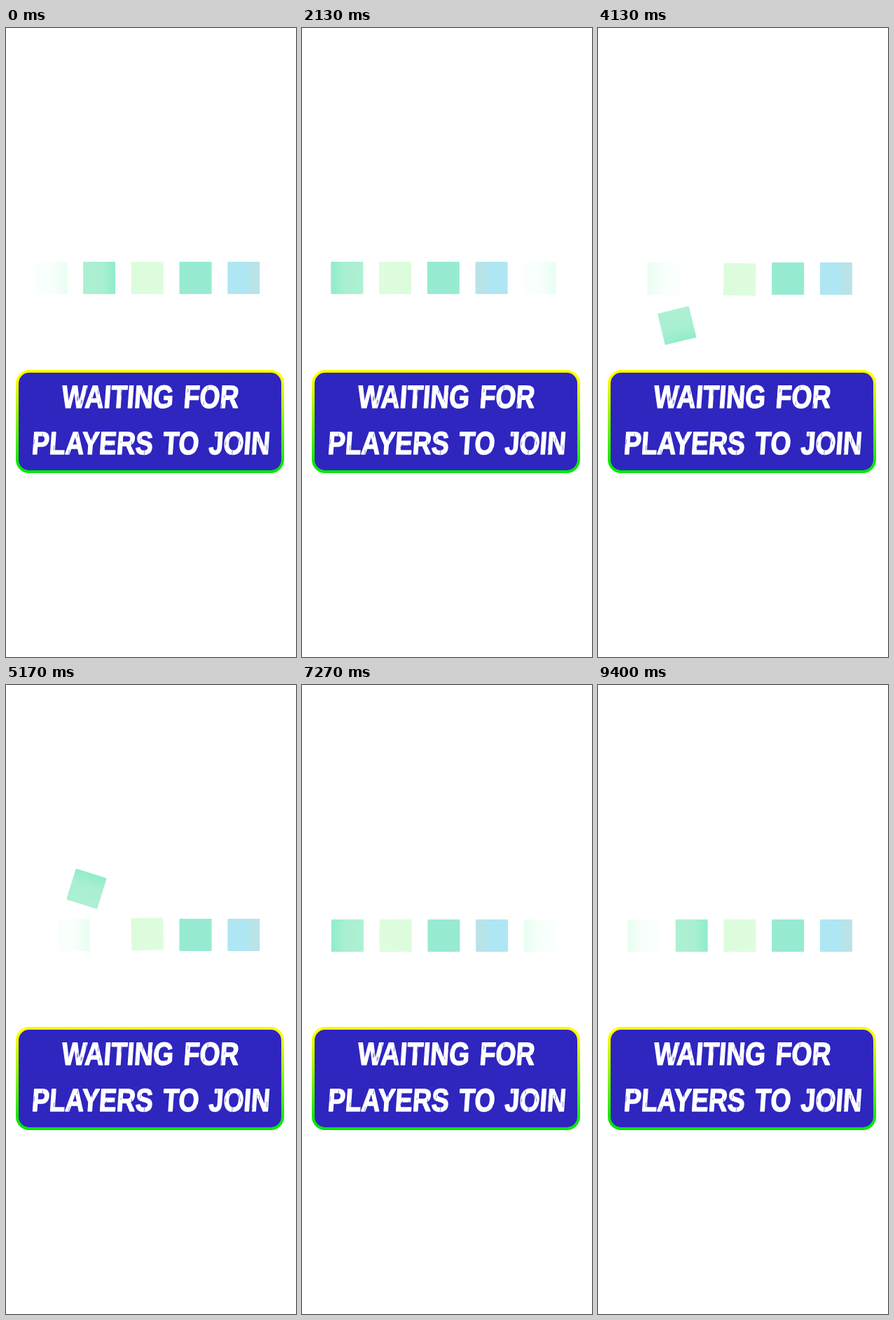
These frames come from a looping animation (414x896 px, 9430 ms). An HTML page:

```html
<!DOCTYPE html>
<html lang="en">
<head>
<meta charset="utf-8">
<title>Waiting for players to join</title>
<style>
  html, body { margin: 0; width: 100%; height: 100%; overflow: hidden; background: #fff; }
  svg { display: block; width: 414px; height: 896px; }
  .label {
    font: bold 45.5px "Liberation Sans", Arial, sans-serif;
    word-spacing: 5px;
    text-anchor: middle;
    fill: #fff;
    stroke: #fff;
    stroke-width: 1.6;
    stroke-linejoin: round;
  }
</style>
</head>
<body>
<svg viewBox="0 0 414 896">
  <defs>
    <linearGradient id="rim" x2="0" y2="1">
      <stop stop-color="#ff0"/>
      <stop offset=".08" stop-color="#fbff00"/>
      <stop offset=".92" stop-color="#0be800"/>
      <stop offset="1" stop-color="#00e60c"/>
    </linearGradient>
    <linearGradient id="pale">
      <stop stop-color="#fafffd"/>
      <stop offset=".5" stop-color="#f8fffb"/>
      <stop offset="1" stop-color="#e8fef0"/>
    </linearGradient>
    <linearGradient id="mint">
      <stop stop-color="#aef0d4"/>
      <stop offset=".6" stop-color="#a9efd1"/>
      <stop offset="1" stop-color="#8fedca"/>
    </linearGradient>
    <linearGradient id="lime">
      <stop stop-color="#dcfcdc"/>
      <stop offset="1" stop-color="#dffcdf"/>
    </linearGradient>
    <linearGradient id="sky">
      <stop stop-color="#aee7f3"/>
      <stop offset=".62" stop-color="#aee6f2"/>
      <stop offset=".72" stop-color="#b8e3e8"/>
      <stop offset="1" stop-color="#bbe3e6"/>
    </linearGradient>
  </defs>
  <g id="tiles"></g>
  <rect x="16" y="489" width="379" height="143" rx="17" fill="#2e26bf" stroke="url(#rim)" stroke-width="4"/>
  <text class="label" transform="translate(205 541.3) skewX(-4) scale(.82 1)">WAITING FOR</text>
  <text class="label" transform="translate(206 607.3) skewX(-4) scale(.82 1)">PLAYERS TO JOIN</text>
  <path id="wear" fill="none" stroke="#2e26bf" stroke-width=".8" opacity=".7"/>
</svg>
<script>
  const LOOP = 9430, CYCLE = 4740, DOWN_AT = 2530, DOWN_BASE = 2541;
  const SIZE = 46, PITCH = 68.75, HOP = 68.75;
  const MIDS = [471, 816, 1150, 1560];   // middle of each hop, in ms
  const RISE = 450, SETTLE = 560;        // hop time before and after its middle
  const SLIDE_AT = -28, SLIDE = 2045;

  const tiles = document.getElementById('tiles');

  function tile(fill) {
    const r = document.createElementNS('http://www.w3.org/2000/svg', 'rect');
    const set = { x: -SIZE / 2, y: -SIZE / 2, width: SIZE, height: SIZE, rx: 1, fill };
    for (const k in set) r.setAttribute(k, set[k]);
    return tiles.appendChild(r);
  }

  const slider = tile('url(#pale)');
  const hoppers = ['url(#mint)', 'url(#lime)', '#96ebd2', 'url(#sky)'].map(tile);

  const clamp = v => Math.min(1, Math.max(0, v));
  const sine = u => (1 - Math.cos(Math.PI * u)) / 2;
  const cubic = u => u < .5 ? 4 * u ** 3 : 1 - 4 * (1 - u) ** 3;

  // share of the half turn made, ms from the middle of the hop
  const turn = ms => ms < 0
    ? .5 * clamp(1 + ms / RISE) ** 2.3
    : 1 - .5 * clamp(1 - ms / SETTLE) ** 3;

  function place(el, x, y, angle) {
    el.setAttribute('transform', `translate(${x.toFixed(2)} ${y.toFixed(2)}) rotate(${angle.toFixed(2)})`);
  }

  function draw(time) {
    const c = time >= CYCLE + SLIDE_AT ? time - CYCLE : time;
    const down = c >= DOWN_AT;
    const ms = down ? c - DOWN_BASE : c;
    const x0 = down ? 64.9 : 64.3;
    const y0 = down ? 357 : 356;

    const slid = 4 * sine(clamp((ms - SLIDE_AT) / SLIDE));
    place(slider, x0 + PITCH * (down ? 4 - slid : slid), y0, down ? 180 : 0);

    hoppers.forEach((el, i) => {
      const r = turn(ms - MIDS[down ? 3 - i : i]);
      const slot = down ? i + cubic(r) : i + 1 - cubic(r);
      const lift = HOP * Math.sin(Math.PI * r);
      place(el, x0 + PITCH * slot, y0 + (down ? lift : -lift), -180 * r - (down ? 180 : 0));
    });
  }

  // worn scratches over the lettering
  let seed = 11;
  const rnd = () => (seed = seed * 16807 % 2147483647) / 2147483647;
  let wear = '';
  for (let i = 0; i < 90; i++) {
    const top = i % 2 ? 510 : 576;
    const x = 36 + rnd() * 340, y = top + rnd() * 26, len = 2 + rnd() * 6;
    wear += `M${x.toFixed(1)} ${y.toFixed(1)}l${(-len * .08).toFixed(1)} ${len.toFixed(1)}`;
  }
  document.getElementById('wear').setAttribute('d', wear);

  const start = performance.now();
  function tick() {
    draw((performance.now() - start) % LOOP);
    requestAnimationFrame(tick);
  }
  tick();
</script>
</body>
</html>
```
